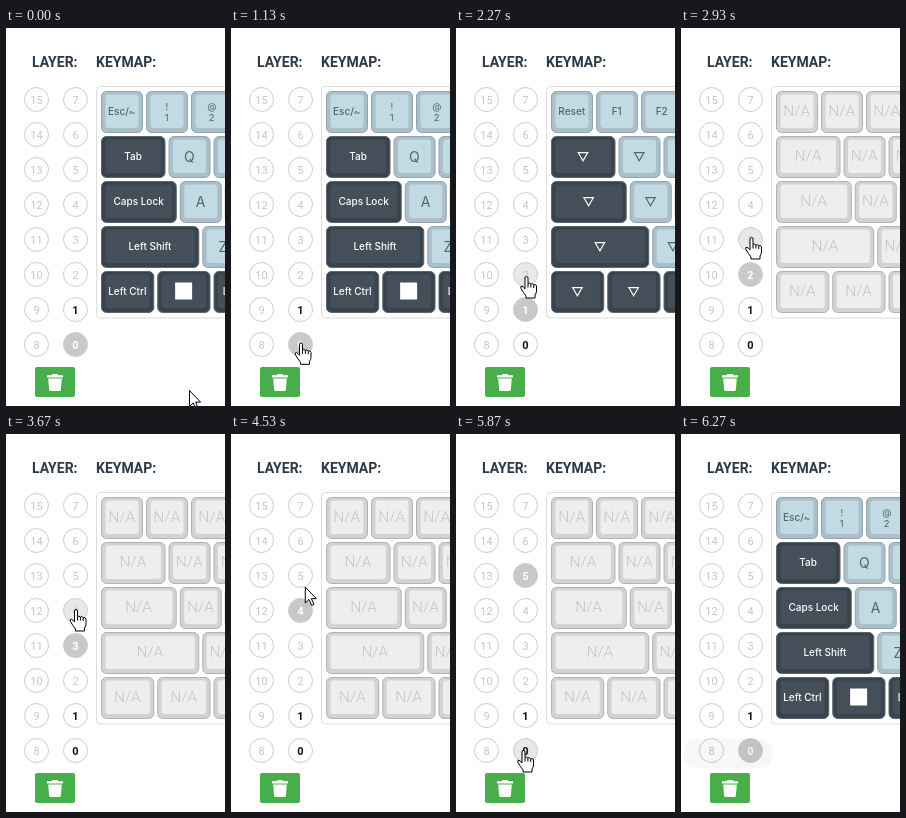
Write an HTML page that moves like this. It is 219 by 378 pixels and loops after 6870 ms.

```html
<!DOCTYPE html>
<html lang="en">
<head>
<meta charset="utf-8">
<title>Keymap layers</title>
<style>
html, body { margin: 0; width: 100%; height: 100%; overflow: hidden; background: #fff; }
svg { display: block; width: 219px; height: 378px; }
text { text-anchor: middle; font: 500 10px Inter, sans-serif; }
.title { text-anchor: start; font: 700 14px Roboto, sans-serif; fill: #2c3a48; }
.num { font: 400 11px Roboto, sans-serif; fill: #c6c6c6; }
.num.used { font-weight: 700; fill: #111; }
.num.on { font-weight: 700; fill: #fff; }
.big { font-size: 14px; font-weight: 400; }
.small { font-size: 9.5px; font-weight: 400; }
.na { font: 300 15.5px Roboto, sans-serif; }
</style>
</head>
<body>
<svg id="stage" viewBox="0 0 219 378"></svg>
<script>
const stage = document.getElementById('stage');
const LOOP = 6870, STEP = 200 / 3;

const rows = [[1, 1, 1], [1.5, 1, 1], [1.75, 1, 1], [2.25, 1], [1.25, 1.25, 1.25]];
const base = [
  ['Esc/~', '! 1', '@ 2'], ['Tab', 'Q', 'W'], ['Caps Lock', 'A', 'S'],
  ['Left Shift', 'Z'], ['Left Ctrl', '■', 'Left Alt']
];
const upper = [['Reset', 'F1', 'F2']];

// edge, side, face, label
const skins = {
  light: ['#91a3ad', '#aabfca', '#c1dae4', '#53636f'],
  dark: ['#5c646c', '#39434d', '#454f5a', '#fff'],
  empty: ['#b2b2b2', '#d3d3d3', '#eee', '#c4c4c4']
};

function label(s, x, y, color) {
  const put = (str, dy, cls = '') =>
    `<text class="${cls}" x="${x}" y="${y + dy}" fill="${color}">${str}</text>`;
  if (s === '■') return `<rect x="${x - 8.5}" y="${y - 9}" width="17" height="17" fill="${color}"/>`;
  if (s === '▽') return `<path d="M${x - 4.7} ${y - 3.8}h9.4l-4.7 8z" fill="none" stroke="${color}" stroke-width="1.2"/>`;
  if (s === 'N/A') return put(s, 4.7, 'na');
  if (s.includes(' ') && s.length === 3) return put(s[0], -2, 'small') + put(s[2], 9, 'small');
  return s.length === 1 ? put(s, 5, 'big') : put(s, 3);
}

function keymap(layer) {
  let out = '';
  rows.forEach((row, r) => {
    let x = 95;
    const y = 63 + r * 45;
    row.forEach((u, c) => {
      const w = u * 45 - 3.5;
      const skin = layer > 1 ? 'empty' : u > 1 ? 'dark' : 'light';
      const [edge, side, face, ink] = skins[skin];
      const s = layer > 1 ? 'N/A' : layer ? (upper[r] || [])[c] || '▽' : base[r][c];
      out += `<rect x="${x + .5}" y="${y + .5}" width="${w - .5}" height="41" rx="5" fill="${side}" stroke="${edge}"/>
        <rect x="${x + 4.5}" y="${y + 3.5}" width="${w - 8.5}" height="33.5" rx="3" fill="${face}"/>`
        + label(s, x + w / 2, y + 20.5, ink);
      x += u * 45;
    });
  });
  return `<g class="map">${out}</g>`;
}

const center = i => [i < 8 ? 69.5 : 30.5, 316.5 - i % 8 * 35];

function circle(i) {
  const [x, y] = center(i);
  return `<circle class="dot" cx="${x}" cy="${y}" r="12" stroke="#ccc"/>
    <text class="num" x="${x}" y="${y + 4}">${i}</text>`;
}

stage.innerHTML = `
  <text class="title" x="26" y="39">LAYER:</text>
  <text class="title" x="90" y="39">KEYMAP:</text>
  <rect x="90.5" y="58.5" width="200" height="231.5" rx="4" fill="#fff" stroke="#ddd"/>
  ${[0, 1, 2].map(keymap).join('')}
  ${Array.from({ length: 16 }, (_, i) => circle(i)).join('')}
  <rect x="29" y="339" width="40" height="30" rx="2" fill="#48ae4c"/>
  <path fill="#fff" d="M46.5 346h5l1 1.2h4.5v2.2h-16v-2.2h4.5zM42.2 350.5h13.6l-.9 11q-.1 1.5-1.6 1.5h-8.6q-1.5 0-1.6-1.5z"/>
  <rect id="tip" x="3" y="305" width="88" height="29" rx="11" fill-opacity=".03"/>
  <g id="cursor" fill="#fff" stroke="#000" stroke-linejoin="round">
    <path id="arrow" d="M.5 .5v16l3.7-3.6 2.7 6 2.3-1-2.6-5.8h5z"/>
    <path id="hand" d="M-1.5 12.5V2Q-1.5 .5 0 .5T1.5 2V7.5Q3 6.5 4.3 8Q6 7 7.2 8.7Q9.5 8 10 10V15Q10 17 8.5 19V22H-.5V20Q-3 17-5.5 12.5Q-6.5 10-4.5 10.2Q-3 11-1.5 13ZM1.5 7.5v4M4.4 8v3.5M7.2 9v3"/>
  </g>`;

const [maps, dots, nums] = ['.map', '.dot', '.num'].map(q => [...stage.querySelectorAll(q)]);
const [tip, cursor, arrow, hand] = ['tip', 'cursor', 'arrow', 'hand'].map(id => document.getElementById(id));
const show = (el, on) => el.setAttribute('display', on ? 'inline' : 'none');

// Moves: start step, end step, x, y, sideways bend
const moves = [
  [0, 11, 69, 317, 0], [16, 22, 70, 281, 4], [27, 34, 70.5, 248, 0], [38, 44, 70.5, 209, 3],
  [51, 55, 70, 175, 4], [64, 71, 70, 138, 4], [76, 85, 67, 321, -17], [87, 88, 67.5, 316, 0],
  [89, 94, 60, 380, 0]
];
const clicks = [[25, 1], [38, 2], [51, 3], [64, 4], [76, 5], [89, 0]];

function pointer(n) {
  let x = 183, y = 362;
  for (const [from, to, tx, ty, bend] of moves) {
    if (n <= from) break;
    const u = Math.min(1, (n - from) / (to - from)), e = u * u * (3 - 2 * u);
    x += (tx - x) * e + bend * Math.sin(Math.PI * e);
    y += (ty - y) * e;
  }
  return [x, y];
}

function draw(t) {
  const n = Math.floor(t / STEP + .07);
  const [x, y] = pointer(n);
  const layer = clicks.reduce((now, [at, to]) => n >= at ? to : now, 0);
  let over = x > 29 && x < 69 && y > 339 && y < 369;

  dots.forEach((dot, i) => {
    const [cx, cy] = center(i);
    const hover = Math.hypot(x - cx, y - cy) < 11.5, on = i === layer;
    over = over || hover;
    dot.setAttribute('fill', on ? '#c9c9c9' : hover ? '#e8e8e8' : '#fff');
    nums[i].setAttribute('class', 'num' + (on ? ' on' : i < 2 ? ' used' : ''));
  });
  maps.forEach((map, i) => show(map, i === Math.min(layer, 2)));
  show(tip, n >= 94);
  show(arrow, !over);
  show(hand, over);
  cursor.setAttribute('transform', `translate(${x} ${y})`);
}

const start = performance.now();
function tick() {
  draw((performance.now() - start) % LOOP);
  requestAnimationFrame(tick);
}
tick();
</script>
</body>
</html>
```
